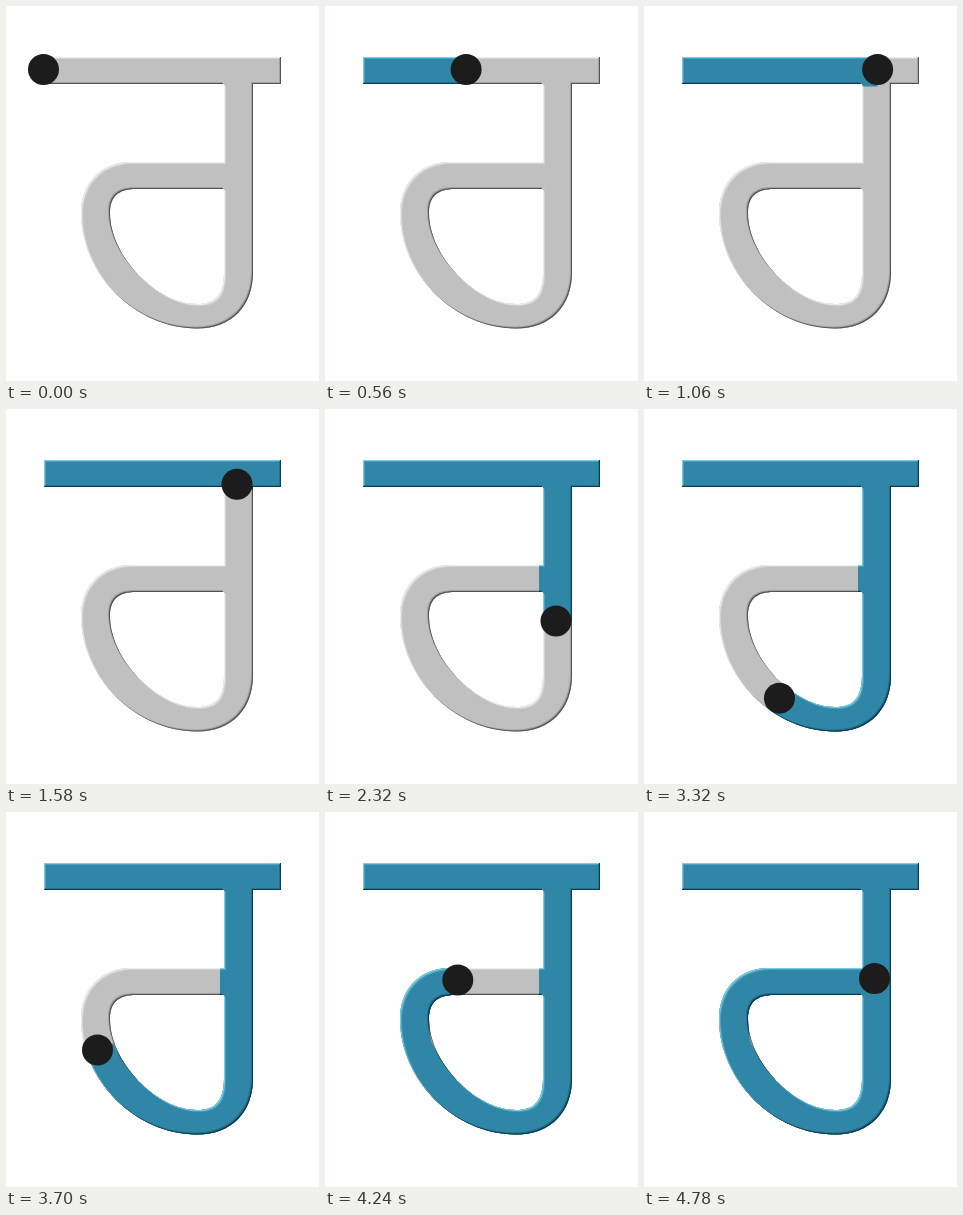
Recreate the animation shown at these times as an HTML page with a canvas. Size 313 by 375 pixels, loop 4800 ms.

```html
<!DOCTYPE html>
<html lang="en">
<head>
<meta charset="utf-8">
<title>Letter stroke order</title>
<style>
html, body { margin: 0; width: 100%; height: 100%; overflow: hidden; background: #fff; }
canvas { display: block; }
</style>
</head>
<body>
<canvas id="stage" width="313" height="375"></canvas>
<script>
const W = 313, H = 375, LOOP = 4800, STEP = 20;
const ctx = document.getElementById('stage').getContext('2d');

const letter = new Path2D(
  'M38 51H275V78H247V266C247 300 226 322.5 191 322.5C130 322.5 75 268 75 207' +
  'C75 178 94 156 125 156H218V78H38Z' +
  'M218 183H130C112 183 104 191 104 207C104 250 150 298 191 298C210 298 218 288 218 266Z');

// Pen route: each leg with the time at which it ends.
const legs = [
  [0, 'M37.5 63.5'],
  [1281, 'H274.5'],
  [1516, 'H231'],
  [2320, 'V212'],
  [2920, 'V268C231 296 221 311.5 204.5 312.5'],
  [3240, 'C185 314.5 165 308 147.5 297'],
  [3700, 'C121 281 102 262 91.5 238'],
  [4780, 'C86 225 86 204 94 189C101 175 112 168 128 168L230.5 166.5']
];
const route = document.createElementNS('http://www.w3.org/2000/svg', 'path');
let d = '';
const keys = legs.map(([time, part]) => {
  d += part;
  route.setAttribute('d', d);
  return { time, length: route.getTotalLength() };
});
const routePath = new Path2D(d);

function makeLayer() {
  const canvas = document.createElement('canvas');
  canvas.width = W;
  canvas.height = H;
  return canvas;
}

// Fills the rim that a shifted copy of the letter leaves uncovered.
function rim(g, offset, color) {
  const outside = new Path2D();
  outside.rect(-50, -50, W + 100, H + 100);
  outside.addPath(letter, new DOMMatrix([1, 0, 0, 1, offset, offset]));
  g.fillStyle = color;
  g.fill(outside, 'evenodd');
}

function embossed(base, light, softLight, dark, softDark) {
  const canvas = makeLayer(), g = canvas.getContext('2d');
  g.fillStyle = base;
  g.fill(letter, 'evenodd');
  g.clip(letter, 'evenodd');
  rim(g, 2, softLight);
  rim(g, -2, softDark);
  rim(g, 1, light);
  rim(g, -1, dark);
  return canvas;
}

const grey = embossed('#c0c0c0', '#ececec', '#d2d2d2', '#555', '#a2a2a2');
const blue = embossed('#2f86a6', '#7accE6', '#479fbe', '#0c3c50', '#246f8b');
const trail = makeLayer(), trailCtx = trail.getContext('2d');
trailCtx.lineWidth = 34;
trailCtx.lineJoin = 'round';

function distanceAt(time) {
  const i = keys.findIndex(key => key.time > time);
  if (i < 0) return keys[keys.length - 1].length;
  const a = keys[i - 1], b = keys[i];
  return a.length + (b.length - a.length) * (time - a.time) / (b.time - a.time);
}

function draw(time) {
  const distance = distanceAt(time);
  const pen = route.getPointAtLength(distance);

  trailCtx.globalCompositeOperation = 'source-over';
  trailCtx.clearRect(0, 0, W, H);
  if (distance > 0) {
    trailCtx.setLineDash([distance, 2000]);
    trailCtx.stroke(routePath);
  }
  trailCtx.globalCompositeOperation = 'source-in';
  trailCtx.drawImage(blue, 0, 0);

  ctx.fillStyle = '#fff';
  ctx.fillRect(0, 0, W, H);
  ctx.drawImage(grey, 0, 0);
  ctx.drawImage(trail, 0, 0);
  ctx.fillStyle = '#1c1c1c';
  ctx.beginPath();
  ctx.arc(pen.x, pen.y, 15.5, 0, Math.PI * 2);
  ctx.fill();
}

const start = performance.now();
function tick() {
  const time = (performance.now() - start) % LOOP;
  draw(Math.floor(time / STEP) * STEP);
  requestAnimationFrame(tick);
}
tick();
</script>
</body>
</html>
```
